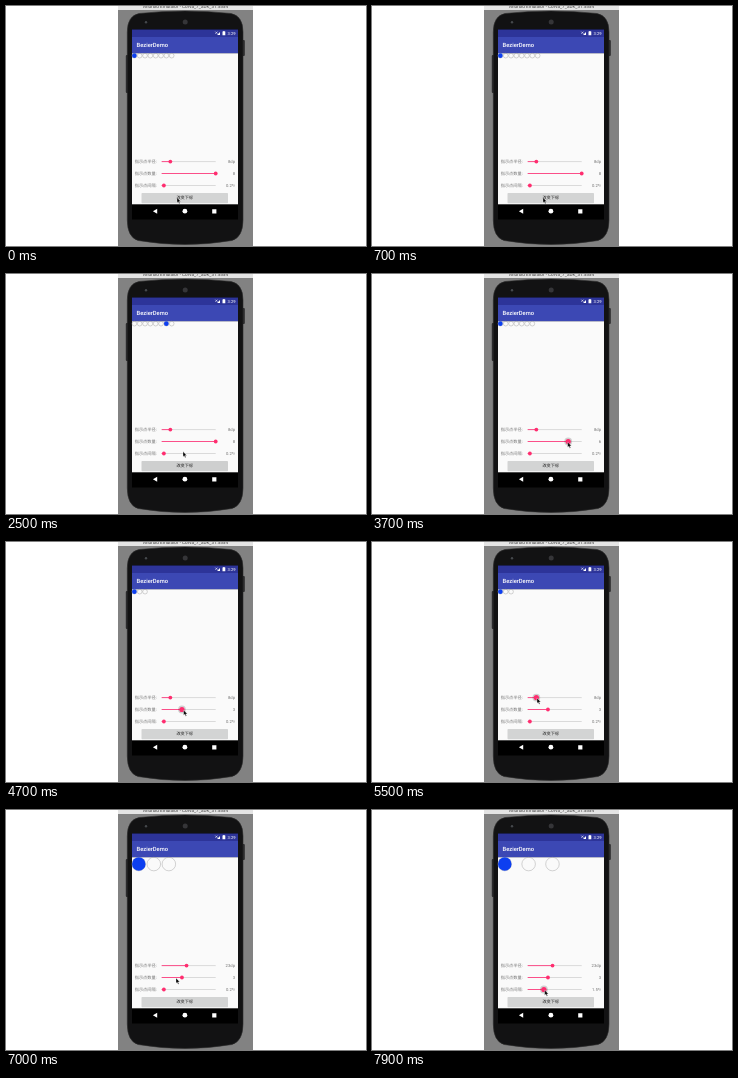
Write an HTML page that moves like this. It is 360 px wide and 240 px high and loops after 8 s.

```html
<!DOCTYPE html>
<html>
<head>
<meta charset="utf-8">
<style>
html, body { margin: 0; width: 100%; height: 100%; overflow: hidden; background: #fff; }
svg { display: block; width: 360px; height: 240px; }
text {
  font: 4.2px Roboto, "Noto Sans CJK SC", "Noto Sans CJK", sans-serif;
  fill: #757575; text-rendering: geometricPrecision;
}
.bar { font-size: 4.6px; fill: #444; text-anchor: middle; }
.title { font-size: 5.8px; font-weight: 500; fill: #fff; }
.clock { fill: #fff; text-anchor: end; }
.button { font-weight: 500; fill: #222; text-anchor: middle; }
.value { text-anchor: end; }
</style>
</head>
<body>
<svg viewBox="0 0 360 240">
  <rect x="112" width="135" height="240" fill="#828282"/>
  <rect x="112" width="135" height="4" fill="#e4e4e4"/>
  <text class="bar" x="179.5" y="2.4">Android Emulator - Corva_7_SDK_31:5554</text>

  <g fill="#2b2b2d">
    <rect x="119.8" y="49" width="3" height="38" rx="1"/>
    <rect x="236" y="34" width="2.8" height="16" rx="1"/>
  </g>
  <path d="M121.3 26Q121.3 10 133 7.5Q179 2.5 225 7.5Q237 10 237 26V214Q237 231 226 234.5Q179 242.5 132 234.5Q121.3 231 121.3 214z" fill="#121213" stroke="#2c2c2d" stroke-width=".6"/>
  <circle cx="140" cy="16.3" r="1.2" fill="#45484c"/>
  <circle cx="179.2" cy="16" r="2.5" fill="#353538"/>

  <rect x="126" y="23.5" width="106" height="190" fill="#000"/>
  <rect x="126" y="23.5" width="106" height="8" fill="#2d3499"/>
  <rect x="126" y="31" width="106" height="16.5" fill="#3c48b4"/>
  <rect x="126" y="47.3" width="106" height="151" fill="#fafafa"/>
  <text class="title" x="130.5" y="41.3">BezierDemo</text>
  <text class="clock" x="229.7" y="28.9">3:29</text>
  <path d="M211 29h3v-3zM216.5 25.6h.8v-.6h1.2v.6h.8v3.6h-2.8z" fill="#fff"/>
  <path d="M209.3 25.6l2.2 2.2m0-2.2l-2.2 2.2" stroke="#fff" stroke-width=".6"/>
  <path d="M151.2 202.8v5l-4.3-2.5zM206.2 203.2h4.2v4.2h-4.2z" fill="#fff"/>
  <circle cx="178.9" cy="205.2" r="2.4" fill="#fff"/>

  <g id="dots" fill="none" stroke="#a0a0a0" stroke-width=".45"></g>
  <path id="blob" fill="#0d3ff0"/>
  <g id="sliders"></g>
  <rect x="135.5" y="187" width="86.5" height="10.2" rx=".7" fill="#d3d4d4"/>
  <rect id="ripple" x="135.5" y="187" width="86.5" height="10.2" rx=".7"/>
  <text class="button" x="178.8" y="193.4">改变下标</text>
  <path id="cursor" d="M0 0v5.2l1.2-1 .9 2 .9-.4-.9-1.9h1.6z" fill="#000" stroke="#fff" stroke-width=".35"/>
</svg>
<script>
const $ = id => document.getElementById(id);
const LOOP = 8000, FRAME = 100, LEFT = 126, TOP = 47.3, DP = 0.2944, TRACK = 155.7, RANGE = 54;
const CLICKS = [880, 1140, 1400, 1660, 1920, 2180], MOVE = 220;

// time, x, y of the pointer tip
const POINTER = [
  [0, 171, 191.5], [2250, 171, 191.5], [2500, 177, 177.5], [2900, 210, 168], [3400, 210, 168],
  [3700, 195.7, 168], [4500, 178, 168], [5050, 177, 168], [5400, 165, 156], [5500, 165, 156],
  [6200, 176, 156], [6700, 181.2, 156], [6850, 181.2, 156], [7150, 158.8, 180], [7250, 158.8, 180],
  [7800, 172.7, 180], [8000, 172.7, 180]
];

const clamp = (v, lo = 0, hi = 1) => Math.min(hi, Math.max(lo, v));

function pointerAt(t) {
  const i = Math.max(1, POINTER.findIndex(p => p[0] >= t));
  const [t0, x0, y0] = POINTER[i - 1], [t1, x1, y1] = POINTER[i];
  const k = (t - t0) / (t1 - t0);
  return [x0 + (x1 - x0) * k, y0 + (y1 - y0) * k];
}

// Each slider follows the pointer, held a little off centre, between its from and to times.
const sliders = [
  { label: '半径', y: 155.6, max: 50, step: 1, grip: 1, start: 8, from: 5450, to: 6750, text: v => v + 'dp' },
  { label: '数量', y: 167.5, max: 8, step: 1, grip: 0, start: 8, from: 2950, to: 4950, text: v => v },
  { label: '间隔', y: 179.5, max: 5, step: 0.1, grip: 1, start: 0.2, from: 7200, to: 8000, text: v => v.toFixed(1) + '*r' }
];

$('sliders').innerHTML = sliders.map(s => `<g>
  <text x="128.7" y="${s.y + 1.8}">指示点${s.label}:</text>
  <path d="M${TRACK} ${s.y}h${RANGE}" stroke="#c4c4c4" stroke-width=".6"/>
  <path class="fill" stroke="#ff4081" stroke-width=".9"/>
  <circle class="halo" cy="${s.y}" r="3.9" fill="#000" opacity=".17"/>
  <circle class="thumb" cy="${s.y}" fill="#ff2d6f"/>
  <text class="value" x="229" y="${s.y + 1.8}"></text></g>`).join('');
sliders.forEach((s, i) => s.node = $('sliders').children[i]);

$('dots').innerHTML = '<circle/>'.repeat(8);

function valueAt(s, t) {
  if (t < s.from) return s.start;
  const x = pointerAt(Math.min(t, s.to))[0] - s.grip;
  return clamp(Math.round((x - TRACK) / RANGE * s.max / s.step) * s.step, 0, s.max);
}

function drawSlider(s, t) {
  const value = valueAt(s, t), held = t >= s.from && t < s.to;
  const x = TRACK + RANGE * value / s.max;
  const part = name => s.node.querySelector('.' + name);
  part('fill').setAttribute('d', `M${TRACK} ${s.y}H${x}`);
  part('halo').setAttribute('cx', x);
  part('halo').style.display = held ? '' : 'none';
  part('thumb').setAttribute('cx', x);
  part('thumb').setAttribute('r', held ? 2.6 : 1.9);
  part('value').textContent = s.text(value);
}

const disc = (x, y, r) => `M${x - r} ${y}a${r} ${r} 0 1 1 ${2 * r} 0a${r} ${r} 0 1 1 ${-2 * r} 0z`;

// Two discs joined by a pinched neck; the front one leads, the rear one catches up.
function blobPath(x, y, r, gap, u) {
  if (!u) return disc(x, y, r);
  const a = x + gap * clamp(2 * u - 1), ra = r * Math.min(1, 2 - 2 * u);
  const b = x + gap * clamp(2 * u), rb = r * (0.2 + 0.8 * u);
  const m = (a + b) / 2, n = Math.min(ra, rb) * 0.9;
  return disc(a, y, ra) + disc(b, y, rb) +
    `M${a} ${y - ra}Q${m} ${y - n} ${b} ${y - rb}V${y + rb}Q${m} ${y + n} ${a} ${y + ra}z`;
}

function draw(t) {
  sliders.forEach(s => drawSlider(s, t));

  // The dots trail the sliders by one frame.
  const [radius, count, spacing] = sliders.map(s => valueAt(s, t - FRAME));
  const r = radius * DP, gap = r * (2 + spacing) + 0.15, y = TOP + r;
  [...$('dots').children].forEach((dot, i) => {
    dot.setAttribute('cx', LEFT + r + i * gap);
    dot.setAttribute('cy', y);
    dot.setAttribute('r', i < count ? r : 0);
  });

  // Changing the count sends the marker back to the first place.
  let index = 0, u = 0;
  if (count === 8) {
    index = CLICKS.filter(c => t >= c + MOVE).length;
    if (index < CLICKS.length) u = clamp((t - CLICKS[index]) / MOVE);
  }
  $('blob').setAttribute('d', blobPath(LEFT + r + index * gap, y, r, gap, u));

  const last = CLICKS.filter(c => c <= t).pop();
  $('ripple').setAttribute('opacity', last ? 0.09 * clamp((last + 400 - t) / 300) : 0);
  $('cursor').setAttribute('transform', `translate(${pointerAt(t)})`);
}

function tick() {
  draw(Math.floor(performance.now() % LOOP / FRAME) * FRAME);
  requestAnimationFrame(tick);
}
tick();
</script>
</body>
</html>
```
